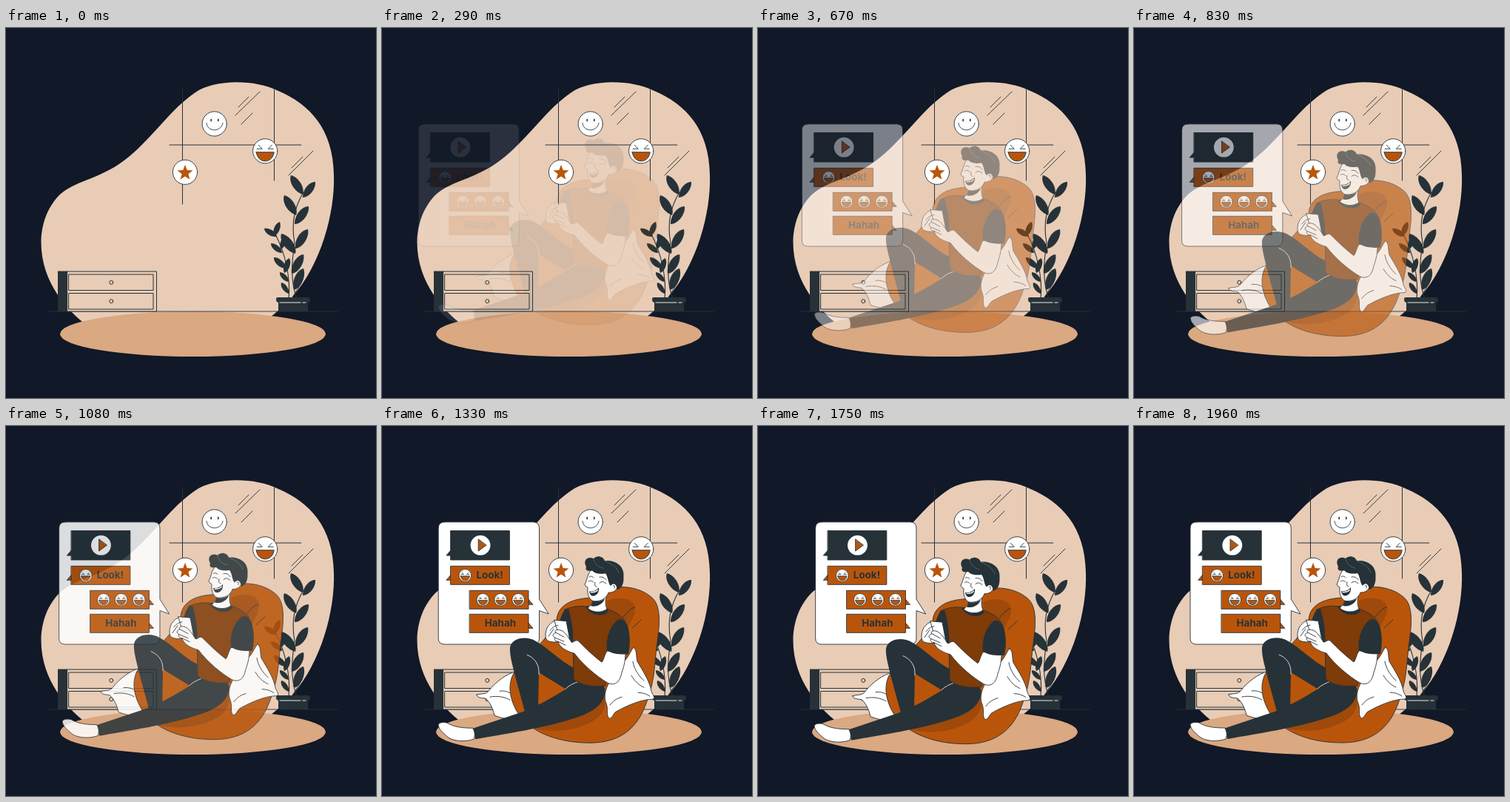
These frames come from a looping animation (500x500 px, 2 s). An HTML page with a canvas:

```html
<!DOCTYPE html>
<html lang="en">
<head>
<meta charset="utf-8">
<title>Chatting at home</title>
<style>
html, body { margin: 0; width: 100%; height: 100%; overflow: hidden; background: #111827; }
canvas { display: block; width: 500px; height: 500px; }
</style>
</head>
<body>
<canvas id="stage"></canvas>
<script>
const SIZE = 500, LOOP = 2000, LEAD = 45, SLIDE = 30;
const NIGHT = '#111827', INK = '#263238', WALL = '#e8ccb6', FLOOR = '#daa881';
const ORANGE = '#b9550b', SHIRT = '#7f3b08', SHADE = '#9f490a', WHITE = '#fff';
const dpr = window.devicePixelRatio || 1;

function setup(canvas) {
  canvas.width = canvas.height = SIZE * dpr;
  const c = canvas.getContext('2d');
  c.scale(dpr, dpr);
  c.lineCap = c.lineJoin = 'round';
  return c;
}
const main = setup(document.getElementById('stage'));
const room = setup(document.createElement('canvas'));
const layer = setup(document.createElement('canvas'));

function shape(c, d, fill, stroke, width = 0.9) {
  const p = new Path2D(d);
  if (fill) { c.fillStyle = fill; c.fill(p); }
  if (stroke) { c.strokeStyle = stroke; c.lineWidth = width; c.stroke(p); }
}
const lines = (c, d, color = INK, width = 0.9) => shape(c, d, null, color, width);

function oval(c, x, y, rx, ry, fill, stroke, width = 0.9) {
  c.beginPath();
  c.ellipse(x, y, rx, ry, 0, 0, 2 * Math.PI);
  if (fill) { c.fillStyle = fill; c.fill(); }
  if (stroke) { c.strokeStyle = stroke; c.lineWidth = width; c.stroke(); }
}

function laugh(c, x, y, r) {
  c.save();
  c.translate(x, y);
  c.scale(r / 16.5, r / 16.5);
  const w = r > 12 ? 0.9 : 1.5;
  oval(c, 0, 0, 16.5, 16.5, WHITE, INK, w);
  lines(c, 'M-9 -8L-4 -3H-11M9 -8L4 -3H11', INK, w);
  shape(c, 'M-12 1.5H12C11 9 6 13.5 0 13.5C-6 13.5 -11 9 -12 1.5Z', ORANGE, INK, w);
  c.restore();
}

function star(c, x, y, r) {
  c.beginPath();
  for (let i = 0; i < 10; i++) {
    const a = i * Math.PI / 5 - Math.PI / 2, d = i % 2 ? r * 0.42 : r;
    c.lineTo(x + d * Math.cos(a), y + d * Math.sin(a));
  }
  c.closePath();
  c.fillStyle = ORANGE;
  c.fill();
}

// Leaf from its base to its tip
function leaf(c, [bx, by, tx, ty]) {
  const dx = tx - bx, dy = ty - by, k = 0.25;
  const at = (u, s) => `${bx + dx * u - dy * s} ${by + dy * u + dx * s}`;
  shape(c, `M${bx} ${by}C${at(0.2, k)} ${at(0.75, k)} ${tx} ${ty}` +
    `C${at(0.8, -k)} ${at(0.3, -k)} ${bx} ${by}Z`, INK);
}

function drawPlant(c) {
  lines(c, 'M393 366C383 337 387 312 390 290C385 264 391 240 402 222', INK, 1.1);
  lines(c, 'M382 366C385 338 377 303 364 279', INK, 1.1);
  lines(c, 'M386 366L397 348', INK, 1);
  [
    [401, 225, 385, 199], [401, 229, 418, 208], [392, 253, 376, 226],
    [390, 265, 409, 241], [391, 305, 372, 278], [391, 298, 408, 272],
    [386, 332, 402, 306], [389, 354, 402, 325],
    [366, 282, 349, 271], [362, 281, 370, 262], [373, 304, 358, 291],
    [371, 299, 378, 281], [378, 325, 362, 310], [376, 331, 383, 311],
    [382, 343, 370, 330], [382, 359, 372, 344]
  ].forEach(l => leaf(c, l));
  shape(c, 'M367 364H409Q411 364 411 367Q411 371 408 371V383H368V371Q365 370 365 367Q365 364 367 364Z', INK);
  lines(c, 'M370 371H398M401 371H405', WHITE, 0.9);
}

function drawRoom(c) {
  c.fillStyle = NIGHT;
  c.fillRect(0, 0, SIZE, SIZE);
  shape(c, 'M47.5 290C47.5 264 57 240 74 224C96 205 130 204 166 174C200 146 222 110 256 87' +
    'C280 70 334 68 368 85C410 103 442 136 443 198C445 250 425 320 388 362' +
    'C380 373 370 380 358 390V400H107C85 383 47.5 345 47.5 290Z', WALL);
  oval(c, 252.5, 413.5, 179.5, 30.5, FLOOR);
  lines(c, 'M57 383H448');
  lines(c, 'M238.5 83V238M362.5 83V206M221 158H399', INK, 1);
  lines(c, 'M310 118L343 86M314 107L328 93M318 130L333 115M382 199L415 166M386 189L401 174');

  shape(c, 'M83 329H203.5V383H83Z', WALL, INK, 1);
  shape(c, 'M70 328.5H83V383H70Z', INK);
  lines(c, 'M85 333H199V354.5H85ZM85 358.5H199V380H85Z', INK, 1);
  oval(c, 142.3, 343.8, 2.5, 2.5, null, INK, 1);
  oval(c, 142.3, 369.2, 2.5, 2.5, null, INK, 1);

  oval(c, 281.7, 129.5, 16.6, 16.6, WHITE, INK);
  oval(c, 277.2, 124.6, 0.9, 2, INK);
  oval(c, 286.8, 124.6, 0.9, 2, INK);
  lines(c, 'M271 128.5C272 141 291 141 293 128.5');
  laugh(c, 350.2, 166.3, 16.6);
  oval(c, 242, 194.8, 16.6, 16.6, WHITE, INK);
  star(c, 242, 195.8, 11);
  drawPlant(c);
}

function drawSeat(c) {
  // Rear cushion
  shape(c, 'M128 363C134 361 140 363 144 358C154 345 168 335 182 331L195 360L182 398' +
    'C172 397 160 394 152 391C150 382 146 373 140 368C135 367 129 368 128 363Z', WHITE, INK);
  lines(c, 'M146 366C156 364 166 366 173 370M159 358C165 357 171 359 175 362');

  // Bean bag
  shape(c, 'M236 264C236 242 256 233 282 232C300 213 342 212 364 231C378 242 375 270 372 292' +
    'C368 318 370 340 358 372C346 408 322 428 281 428C232 428 196 410 182 385' +
    'C172 367 168 345 182 328C200 306 222 290 236 264Z', ORANGE, INK);
  shape(c, 'M304 236C324 228 345 234 342 250C340 260 333 268 330 280L305 262Z', SHADE);
  shape(c, 'M205 408C240 396 275 385 301 362C306 388 290 400 262 408C242 413 222 413 205 408Z', SHADE);
  lines(c, 'M338 273L350 262M326 258C331 251 337 246 341 245');

  // Front cushion
  shape(c, 'M340 299C345 303 343 310 345 318C352 330 362 345 364 358C366 364 370 367 366 369' +
    'C351 369 332 377 316 386C313 388 311 395 307 395C302 390 307 382 302 372' +
    'C298 356 310 340 325 320C334 312 336 303 340 299Z', WHITE, INK);
  lines(c, 'M339 318C340 327 347 338 354 344M337 337C341 344 347 350 354 353M308 377C313 370 318 368 324 366M346 360C352 360 358 362 362 365');
}

function drawHead(c) {
  shape(c, 'M286 229C286 238 282 242 278 246C286 253 298 252 304 247C301 240 302 233 304 226Z', WHITE, INK);
  shape(c, 'M285 236C291 238 297 236 301 233C299 240 290 245 282 243Z', INK);
  shape(c, 'M282 195C277 202 278 206 274 214C275 217 277 217 278 218C277 227 280 235 286 236.5' +
    'C296 237 303 233 306 225C312 225 318 222 318 216C318 210 311 210 308 214C306 206 304 198 300 194Z', WHITE, INK);
  shape(c, 'M276 190C271 181 278 175 286 179C291 174 299 176 301 182C316 181 328 189 326.5 204' +
    'C327 214 323 220 318 221C317 213 312 211 309 216C305 211 306 204 302 199' +
    'C296 200 288 200 284 195C278 197 274 194 276 190Z', INK);
  lines(c, 'M301 182C310 186 317 190 320 198M286 180C288 187 293 191 299 192', '#62717a', 0.7);
  lines(c, 'M279 210C281 208 284 209 286 211M294 212C297 209 300 210 303 213' +
    'M280 204C282 202 285 203 286 205M294 204C298 203 301 205 303 208' +
    'M288 211C287 215 288 217 290 217M312 216C314 214 315 216 314 219');
  shape(c, 'M280 223C285 224 290 222 293 218C294 226 288 231 283 229C281 227 280 225 280 223Z', INK);
  lines(c, 'M282 224.5C286 225 289 224 291.5 221.5', WHITE, 1.3);
}

function drawPerson(c) {
  // Shoe and legs
  shape(c, 'M76 403C78 400 84 400 88 401C98 407 110 408 123 408C126 412 126 418 124 423' +
    'C112 427 98 426 90 421C84 416 76 410 76 403Z', WHITE, INK);
  shape(c, 'M193 386L181 342C177 325 172 309 173 299C175 286 195 283 207 290' +
    'C225 300 240 317 260 327L278 347L264 362L248 355L212 333L211 384Z', INK);
  shape(c, 'M122.5 408.5L190 386C215 376 233 365 252 353C270 342 300 344 301.5 356' +
    'C302 372 290 385 262 394C220 408 165 416 126 423C125 417 125 412 122.5 408.5Z', INK);
  lines(c, 'M196 309C206 313 213 322 212 335M248 355C253 350 260 347 266 345', WHITE, 0.8);

  // Shirt
  shape(c, 'M247 248C260 242 270 243 279 244C286 251 297 252 304 247C314 251 323 255 328 263' +
    'C333 276 325 310 316 320C307 335 303 344 302 351C284 353 268 350 259 342L258 290L246 264Z', SHIRT, INK);
  shape(c, 'M247 248L252 247C256 260 259 277 258 292L240 263C242 257 244 252 247 248Z', INK);
  shape(c, 'M279 243C286 250 297 251 303 246L306 250C299 259 281 256 275 244Z', INK);
  drawHead(c);

  // Far hand and phone
  shape(c, 'M236 263C231 263 228 266 224 271C220 278 220 288 224 290C231 293 240 292 247 289L253 268Z', WHITE, INK);
  shape(c, 'M233 262L249 262C251 262 252 263 253 265L259 296C259 298 258 299 256 298L244 294Z', INK);
  shape(c, 'M233 262L249 263.5L255 295L242 292Z', WHITE, INK);

  // Near arm
  shape(c, 'M304 304C300 310 300 316 297 319C285 310 274 299 266 291C262 287 259 293 256 292' +
    'C252 285 247 278 242 276C237 274 232 276 235 279C230 281 230 284 234 286C232 289 235 291 238 291' +
    'C240 300 252 305 260 307C272 323 290 338 305 347C316 352 322 344 324 333C328 322 329 314 329 306Z', WHITE, INK);
  lines(c, 'M235 279L246 285M234 286L246 291M238 291L248 296M227 276C231 271 234 270 238 269M225 284L232 274');
  shape(c, 'M317 263C323 258 331 263 333 274C336 287 335 298 333 308C323 309 312 308 304 303C302 289 307 272 317 263Z', INK);
}

function row(c, x, y, h, fill, side) {
  const edge = side < 0 ? x : x + 79.5, ty = y + h - 7;
  shape(c, `M${edge} ${ty - 6}L${edge + side * 6} ${ty + 1}H${edge}Z`, fill, INK);
  shape(c, `M${x} ${y}h79.5v${h}h-79.5Z`, fill, INK);
}

function label(c, text, x, y) {
  c.fillStyle = INK;
  c.fillText(text, x, y);
}

function drawChat(c) {
  shape(c, 'M84.5 129.8H204Q212.3 129.8 212.3 138V234L225 254L212.3 249.5V287Q212.3 295 204 295' +
    'H84.5Q76 295 76 287V138Q76 129.8 84.5 129.8Z', WHITE, INK);
  row(c, 92.7, 141.5, 39.5, INK, -1);
  oval(c, 132.8, 161.2, 13.4, 13.4, WHITE);
  shape(c, 'M130 153.2V169L140.5 161.2Z', ORANGE, INK);
  row(c, 92.7, 189.3, 25, ORANGE, -1);
  laugh(c, 112.2, 202, 8.4);
  row(c, 118.3, 222.3, 25, ORANGE, 1);
  for (let i = 0; i < 3; i++) laugh(c, 136.2 + i * 23.9, 234.8, 8.4);
  row(c, 118.3, 254.3, 25, ORANGE, 1);
  c.font = '700 13.4px Inter, "Open Sans", sans-serif';
  label(c, 'Look!', 127.2, 206.2);
  label(c, 'Hahah', 138.6, 271.2);
}

// cubic-bezier(.36, -.01, .5, 1.38): a soft start and a slight overshoot
function ease(x) {
  const curve = (a, b, t) => 3 * a * t * (1 - t) ** 2 + 3 * b * t * t * (1 - t) + t ** 3;
  let lo = 0, hi = 1;
  for (let i = 0; i < 24; i++) {
    const mid = (lo + hi) / 2;
    if (curve(0.36, 0.5, mid) < x) lo = mid; else hi = mid;
  }
  return curve(-0.01, 1.38, lo);
}

function fade(alpha, dx, dy, ...parts) {
  layer.clearRect(0, 0, SIZE, SIZE);
  layer.save();
  layer.translate(dx, dy);
  parts.forEach(draw => draw(layer));
  layer.restore();
  main.globalAlpha = alpha;
  main.drawImage(layer.canvas, 0, 0, SIZE, SIZE);
  main.globalAlpha = 1;
}

drawRoom(room);
const start = performance.now();

function frame(now) {
  const time = Math.max(0, now - start) % LOOP;
  const p = ease(Math.min(1, (time + LEAD) / LOOP));
  const alpha = Math.min(1, Math.max(0, p)), shift = (p - 1) * SLIDE;
  main.drawImage(room.canvas, 0, 0, SIZE, SIZE);
  fade(alpha, shift, 0, drawChat);
  fade(alpha, 0, shift, drawSeat, drawPerson);
  requestAnimationFrame(frame);
}
frame(start);
</script>
</body>
</html>
```
